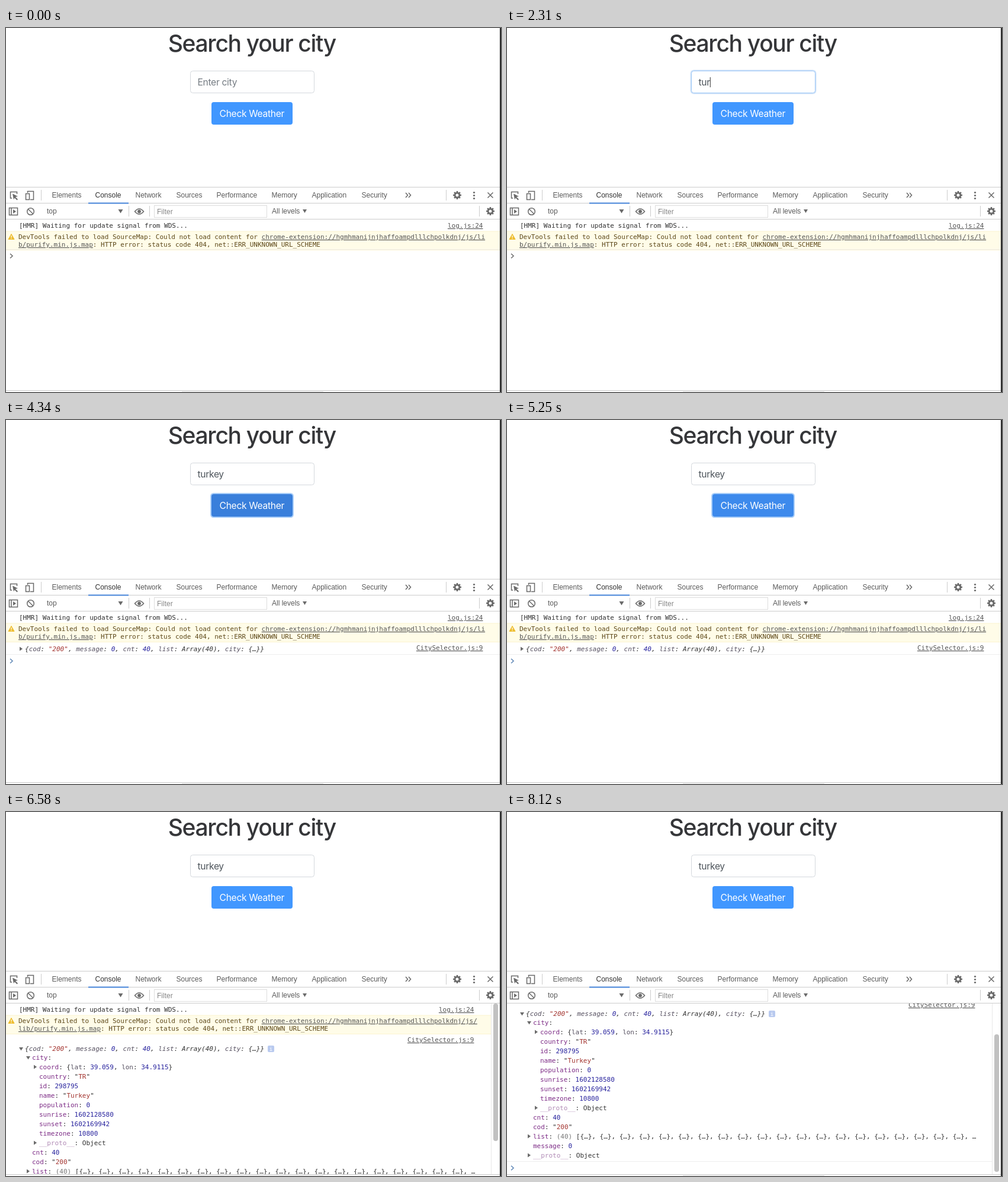
Animation of 836 by 614 pixels, one loop 8.19 s. Source, as an HTML page:

```html
<!DOCTYPE html>
<html lang="en">
<head>
<meta charset="utf-8">
<title>Search your city</title>
<style>
html, body { margin: 0; width: 100%; height: 100%; overflow: hidden; background: #fff; }
svg { display: block; }
text { white-space: pre; }
.page { font-family: Inter, "Open Sans", sans-serif; font-size: 15.6px; letter-spacing: -.02em; }
.ui { font: 12px "Liberation Sans", sans-serif; fill: #5a5a5a; }
.mono { font: 11px "DejaVu Sans Mono", monospace; fill: #303030; }
.key { fill: #7d2c86; } .num { fill: #25209c; } .str { fill: #a3342f; }
.dim { fill: #777; } .proto { fill: #b18bb6; } .prop { fill: #565060; }
.link { fill: #555; text-decoration: underline; }
.warn { fill: #5c4718; }
.italic { font-style: italic; }
.icon { fill: none; stroke: #6a6a6a; stroke-width: 1.5; }
.solid { fill: #6a6a6a; }
</style>
</head>
<body>
<svg id="stage" width="836" height="614" viewBox="0 0 836 614"></svg>
<script>
const LOOP = 8190, FOCUS = 770, HOVER = 2640, CLICK = 3150, LOGGED = 3990;
const LEAVE = 5180, OPEN = 5600, OPEN_CITY = 6440;
const KEYS = [1820, 2030, 2240, 2400, 2520, 2640];

const line = (x1, y1, x2, y2, color = '#ccc', w = 1) =>
  `<path d="M${x1} ${y1}L${x2} ${y2}" stroke="${color}" stroke-width="${w}"/>`;
const rect = (x, y, w, h, attrs) => `<rect x="${x}" y="${y}" width="${w}" height="${h}" ${attrs}/>`;
const icon = d => `<path class="icon" d="${d}"/>`;
const solid = d => `<path class="solid" d="${d}"/>`;
const text = (cls, x, y, s, attrs = '') => `<text class="${cls}" x="${x}" y="${y}" ${attrs}>${s}</text>`;
// Turns "<num:40>" into a coloured span.
const spans = s => s.replace(/<(\w+):([^>]*)>/g, '<tspan class="$1">$2</tspan>');
const mono = (x, y, s, cls = '') => text('mono ' + cls, x, y, spans(s));
const arrow = (x, y, open) => solid(open
  ? `M${x} ${y - 6}h7l-3.5 5.5z` : `M${x + 1} ${y - 7.5}v7l5 -3.5z`);
const group = (id, body, attrs = '') => `<g id="${id}" ${attrs}>${body}</g>`;

function gear(x, y) {
  let teeth = '';
  for (let i = 0; i < 8; i++) {
    const c = Math.cos(i * Math.PI / 4), s = Math.sin(i * Math.PI / 4);
    teeth += `M${x + 4 * c} ${y + 4 * s}L${x + 7 * c} ${y + 7 * s}`;
  }
  return `<circle class="icon" cx="${x}" cy="${y}" r="3.9" style="stroke-width:2.8"/>` +
    `<path class="icon" style="stroke-width:2.6" d="${teeth}"/>`;
}

function page() {
  return text('page', 415.3, 40, 'Search your city',
      'text-anchor="middle" fill="#353639" style="font-size:39px;font-weight:500;letter-spacing:-.034em"') +
    rect(309.5, 70.5, 213, 41, 'id="ring" rx="6" fill="#cfe2f8"') +
    rect(311.5, 72.5, 209, 37, 'id="field" rx="4" fill="#fff"') +
    text('page', 323.5, 97, '', 'id="typed"') +
    rect(0, 83, 1, 17, 'id="caret" fill="#333"') +
    rect(345, 123, 141, 42, 'id="buttonRing" rx="5.5" fill="#a9cef9"') +
    rect(347, 125, 137, 38, 'id="button" rx="4"') +
    text('page', 415.3, 150, 'Check Weather', 'text-anchor="middle" fill="#fff"');
}

function toolbars() {
  const tabs = { Elements: 77.5, Console: 150.5, Network: 218.5, Sources: 287.5,
    Performance: 355.5, Memory: 448.5, Application: 516.5, Security: 600.5 };
  let s = line(0, 268.5, 834, 268.5) + line(0, 295.5, 834, 295.5) + line(0, 322.5, 834, 322.5);
  for (const name in tabs)
    s += text('ui', tabs[name], 286, name, name === 'Console' ? 'style="fill:#333"' : '');
  s += rect(139, 294.5, 68, 2, 'fill="#4583d8"');
  for (const x of [59.5, 743.5]) s += line(x, 273, x, 291);
  for (const x of [207.5, 242.5, 799.5]) s += line(x, 300, x, 318);
  s += icon('M10 287H7.500V276.500H18.500V280') + solid('M11 279.500l9 4.500-4 1 4 4-1.500 1.500-4-4-1.500 3z');
  s += icon('M36.500 278V275.500H46.500V289.500H41M33.500 279.500h6v10h-6z');
  s += icon('M675 278l3.500 4-3.500 4M680 278l3.500 4-3.500 4');
  s += gear(762, 282) + gear(818, 309);
  for (const y of [277.5, 282.5, 287.5]) s += `<circle class="solid" cx="790.500" cy="${y}" r="1.600"/>`;
  s += icon('M813.500 277.500l9 9M822.500 277.500l-9 9');
  s += icon('M5.500 303.500h14v12h-14zM9 304v11') + solid('M12 306v7l5-3.500z');
  s += '<circle class="icon" cx="41.500" cy="309.500" r="5.800"/>' + icon('M37.500 305.500l8 8');
  s += text('ui', 69, 313, 'top') + solid('M189.500 306h8l-4 6.500z');
  s += icon('M217.500 309.500Q225 300.500 232.500 309.500Q225 318.500 217.500 309.500z') +
    '<circle class="solid" cx="225" cy="309.500" r="2.900"/>';
  s += rect(250.5, 299.5, 190, 20, 'fill="#fff" stroke="#ddd"') + text('ui', 255, 314, 'Filter', 'style="fill:#888"');
  s += text('ui', 449, 313, 'All levels') + solid('M501 306h7l-3.500 6z');
  return s;
}

// Messages above the logged object; the link breaks earlier when a scrollbar takes space.
function messages(right, head, tail) {
  return mono(22, 337, '[HMR] Waiting for update signal from WDS...') +
    text('mono link', right, 337, 'log.js:24', 'text-anchor="end"') +
    rect(0, 343, right + 29, 31.5, 'fill="#fffce8"') +
    line(0, 343, right + 29, 343, '#fbf3cf') + line(0, 374.5, right + 29, 374.5, '#fbf3cf') +
    '<path d="M9 347.500l5 9H4z" fill="#eebd2f" stroke="#eebd2f" stroke-linejoin="round"/>' +
    line(9, 350, 9, 353.500, '#fff', 1.2) + line(9, 354.500, 9, 355.700, '#fff', 1.2) +
    mono(21, 356, 'DevTools failed to load SourceMap: Could not load content for ' +
      `<link:chrome-extension://hgmhmanijnjhaffoampdlllchpolkdnj/js/${head}>`, 'warn') +
    mono(21, 369, `<link:${tail}/purify.min.js.map>: HTTP error: status code 404, net::ERR_UNKNOWN_URL_SCHEME`, 'warn');
}

const summary = (y, open) => arrow(22, y, open) +
  mono(32, y, '{<prop:cod>: <str:"200">, <prop:message>: <num:0>, <prop:cnt>: <num:40>, ' +
    '<prop:list>: Array(40), <prop:city>: {…}}', 'italic') +
  (open ? rect(442, y - 9, 11, 11, 'rx="2" fill="#b9caef"') +
    text('mono', 447.5, y, 'i', 'text-anchor="middle" style="fill:#fff;font-size:9px"') : '');
const source = right => text('mono link', right, 388, 'CitySelector.js:9', 'text-anchor="end"');
const footer = (y, right) => line(0, y - 10.5, right, y - 10.5, '#eee') + icon(`M7 ${y - 3.2}l4 3.700-4 3.700`);

// Each row: indent level, arrow ('>' closed, 'v' open, '' none), content.
const tree = rows => rows.map(([level, mark, s], i) => {
  const x = 32 + level * 12, y = 418 + i * 16;
  return (mark ? arrow(x - 10, y, mark === 'v') : '') + mono(x, y, s);
}).join('');

const proto = level => [level, '>', '<proto:__proto__>: Object'];
const entries = end => [
  [1, '', '<key:cnt>: <num:40>'],
  [1, '', '<key:cod>: "<str:200>"'],
  [1, '>', '<key:list>: <dim:(40)> [' + '{…}, '.repeat(20) + end],
  [1, '', '<key:message>: <num:0>'],
  proto(1)
];
const closedCity = [[1, '>', '<key:city>: {<prop:id>: <num:298795>, <prop:name>: <str:"Turkey">, <prop:coord>: {…}, ' +
  '<prop:country>: <str:"TR">, <prop:population>: <num:0>, …}']];
const openCity = [
  [1, 'v', '<key:city>:'],
  [2, '>', '<key:coord>: {<prop:lat>: <num:39.059>, <prop:lon>: <num:34.9115>}'],
  [2, '', '<key:country>: "<str:TR>"'],
  [2, '', '<key:id>: <num:298795>'],
  [2, '', '<key:name>: "<str:Turkey>"'],
  [2, '', '<key:population>: <num:0>'],
  [2, '', '<key:sunrise>: <num:1602128580>'],
  [2, '', '<key:sunset>: <num:1602169942>'],
  [2, '', '<key:timezone>: <num:10800>'],
  proto(2)
];

const tooltip = rect(68.5, 447.5, 35, 22, 'rx="2" fill="#f8f8f8" fill-opacity=".82" stroke="#ccc"') +
  text('ui', 77, 462, 'cnt', 'style="font-size:13px;fill:#444"');

const wide = messages(805.5, 'li', 'b');
const views = [
  wide + footer(384, 834),
  wide + source(805.5) + summary(390, false) + footer(406, 834),
  wide + source(805.5) + summary(403, true) + tree([...closedCity, ...entries('{……')]) + footer(515, 834) + group('tip', tooltip),
  messages(790.5, '', 'lib') + source(790.5) + summary(403, true) + tree([...openCity, ...entries('…')]) + footer(659, 819)
];

const stage = document.getElementById('stage');
stage.innerHTML = '<clipPath id="clip"><rect y="323" width="834" height="288"/></clipPath>' +
  rect(0, 0, 836, 614, 'fill="#fff"') + page() + toolbars() +
  `<g clip-path="url(#clip)">${views.map((v, i) => group('view' + i, v)).join('')}` +
  group('scrollbar', line(819.5, 323, 819.5, 611, '#e8e8e8') +
    rect(823, 323, 8, 232, 'id="thumb" rx="4" fill="#c1c1c1"')) + '</g>' +
  line(0, 611.5, 834, 611.5, '#c9c9c9') + line(297, 613.5, 536, 613.5, '#ddd') +
  rect(834, 0, 2, 614, 'fill="#2b2b2b"');

const el = id => document.getElementById(id);
const set = (id, attrs) => { for (const k in attrs) el(id).setAttribute(k, attrs[k]); };
const show = (id, on) => { el(id).style.display = on ? '' : 'none'; };
const ramp = (t, start, ms) => Math.min(1, Math.max(0, (t - start) / ms));
const ease = u => u * u * (3 - 2 * u);
const pulse = (t, on, off, ms = 150) => ease(ramp(t, on, ms)) - ease(ramp(t, off, ms));
const mix = (a, b, u) => `rgb(${a.map((v, i) => Math.round(v + (b[i] - v) * u))})`;

function render(t) {
  const focus = pulse(t, FOCUS, CLICK);
  set('ring', { opacity: focus });
  set('field', { stroke: mix([212, 216, 221], [158, 200, 247], focus) });

  const count = KEYS.filter(k => t >= k).length;
  const typed = el('typed');
  const value = count ? 'turkey'.slice(0, count) : 'Enter city';
  if (typed.textContent !== value) typed.textContent = value;
  set('typed', { fill: count ? '#4d545b' : '#757c83' });
  const lastInput = count ? KEYS[count - 1] : FOCUS;
  show('caret', t >= FOCUS && t < CLICK && (t - lastInput) % 1000 < 500);
  set('caret', { x: 323.5 + (count ? typed.getComputedTextLength() : 0) });

  set('button', { fill: mix([65, 151, 255], [57, 127, 219], pulse(t, HOVER, LEAVE)) });
  set('buttonRing', { opacity: pulse(t, CLICK, OPEN - 60) });

  const view = [LOGGED, OPEN, OPEN_CITY].filter(k => t >= k).length;
  views.forEach((_, i) => show('view' + i, i === view));
  show('tip', t >= 5950 && t < 6160);

  const scroll = 59 * (1 - (1 - ramp(t, 7240, 360)) ** 2.6);
  const offset = t < 7240 ? 0 : Math.round(scroll);
  set('view3', { transform: `translate(0 ${-offset})` });
  show('scrollbar', view === 3);
  set('thumb', { y: 323 + offset * .88 });

  stage.querySelectorAll('[d^="M7 "]').forEach(p => { p.style.stroke = t < HOVER ? '#6a6a6a' : '#5d86b5'; });
}

function tick(now) {
  render(now % LOOP);
  requestAnimationFrame(tick);
}
render(0);
requestAnimationFrame(tick);
</script>
</body>
</html>
```
